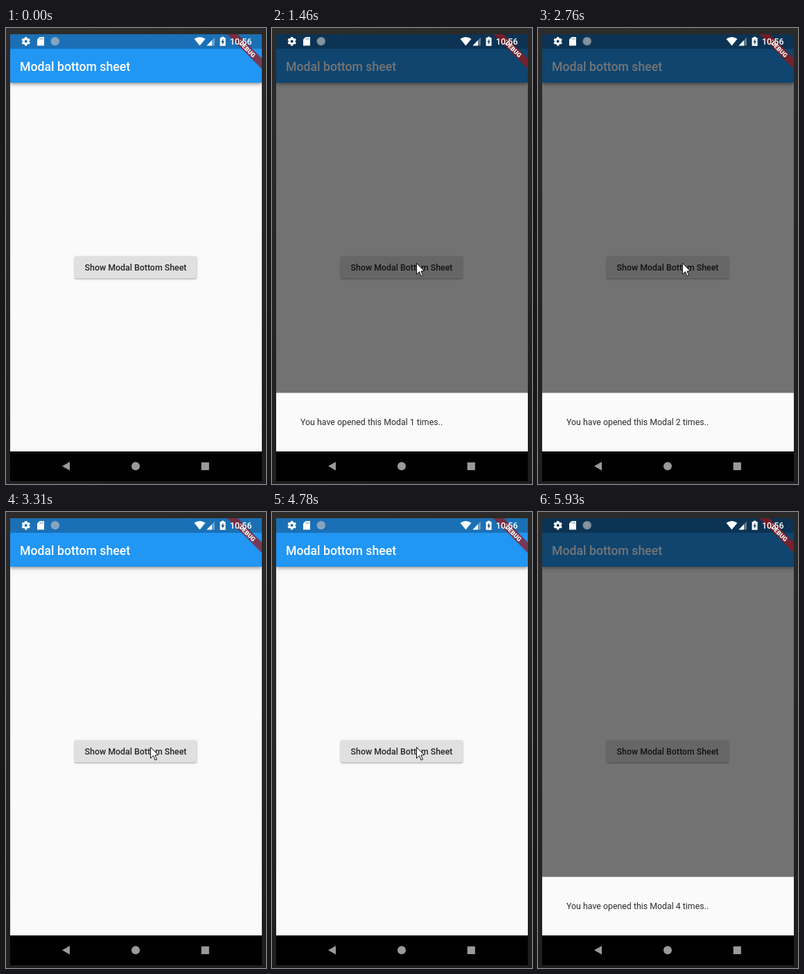
These frames come from a looping animation (375 by 658 pixels, 6.87 s). An HTML page with a canvas:

```html
<!DOCTYPE html>
<html lang="en">
<head>
<meta charset="utf-8">
<title>Modal bottom sheet</title>
<style>
  html, body { margin: 0; width: 100%; height: 100%; overflow: hidden; background: #222; }
  canvas { display: block; width: 375px; height: 658px; }
</style>
</head>
<body>
<canvas id="stage"></canvas>
<script>
const W = 375, H = 658, LOOP = 6870;
const L = 6, R = 369, TOP = 9, BOTTOM = 611, END = 654;
const STEP = 76.7;                 // screen refresh, ms
const SHEET_H = 84.5, SLIDE = 250, OPEN_DELAY = 170;
const PRESS_HOLD = 2 * STEP;
const ENTER = 360, ENTER_MS = 550, LEAVE = 5613, LEAVE_MS = 240;
const REST = { x: 208, y: 339 };

// Every press toggles the sheet.
const presses = [990, 1680, 2290, 2980, 3770, 4480, 5090];

const canvas = document.getElementById('stage');
const ctx = canvas.getContext('2d');
const dpr = window.devicePixelRatio || 1;
canvas.width = W * dpr;
canvas.height = H * dpr;

const clamp = v => Math.max(0, Math.min(1, v));
const stepped = ms => Math.floor((ms + 18) / STEP) * STEP;

function pressState(t) {
  const done = presses.filter(p => p <= t);
  const n = done.length;
  if (!n) return { v: 0, count: 0, held: false };
  const dt = stepped(t - done[n - 1]);
  const opening = n % 2 === 1;
  const v = opening ? clamp((dt - OPEN_DELAY) / SLIDE) : clamp(1 - dt / SLIDE);
  return { v, count: Math.ceil(n / 2), held: dt < PRESS_HOLD - 1 };
}

function pointerAt(t) {
  if (t < ENTER) return null;
  if (t < LEAVE) {
    const left = 1 - clamp(stepped(t - ENTER) / ENTER_MS);
    return { x: REST.x + 36 * left, y: REST.y + 163 * left ** 4 };
  }
  const u = stepped(t - LEAVE) / LEAVE_MS;
  return u < 1 ? { x: REST.x + 43 * u ** 2, y: REST.y + 260 * u ** 1.4 } : null;
}

function box(x, y, w, h, fill) {
  ctx.fillStyle = fill;
  ctx.fillRect(x, y, w, h);
}

function disc(x, y, r, fill) {
  ctx.fillStyle = fill;
  ctx.beginPath();
  ctx.arc(x, y, r, 0, Math.PI * 2);
  ctx.fill();
}

function poly(points, fill, stroke) {
  ctx.beginPath();
  points.forEach(([x, y]) => ctx.lineTo(x, y));
  ctx.closePath();
  ctx.fillStyle = fill;
  ctx.fill();
  if (stroke) {
    ctx.strokeStyle = stroke;
    ctx.lineWidth = 1;
    ctx.stroke();
  }
}

function text(str, x, y, size, weight, fill, align = 'left') {
  ctx.font = `${weight} ${size}px Roboto, sans-serif`;
  ctx.textAlign = align;
  ctx.fillStyle = fill;
  ctx.fillText(str, x, y);
}

function shadow(alpha, blur, dy) {
  ctx.shadowColor = `rgba(0,0,0,${alpha})`;
  ctx.shadowBlur = blur * dpr;
  ctx.shadowOffsetY = dy * dpr;
}

function drawBezel() {
  const g = ctx.createLinearGradient(0, 0, W * 0.6, H);
  g.addColorStop(0, '#2d2c2b');
  g.addColorStop(0.45, '#262626');
  g.addColorStop(1, '#1e1e1e');
  box(0, 0, W, H, g);
}

function drawPage() {
  box(L, TOP, R - L, BOTTOM - TOP, '#fafafa');

  ctx.save();
  shadow(0.42, 5, 2);
  box(L, TOP, R - L, 70, '#2196f3');
  ctx.restore();
  box(L, TOP, R - L, 21, '#1b70b5');
  text('Modal bottom sheet', 20, 61.5, 17.66, 500, '#fff');

  ctx.save();
  shadow(0.36, 2.5, 1);
  ctx.fillStyle = '#e0e0e0';
  ctx.beginPath();
  ctx.roundRect(99, 329.5, 176, 31.8, 2);
  ctx.fill();
  ctx.restore();
  text('Show Modal Bottom Sheet', 187, 349.8, 12.36, 500, '#262626', 'center');
}

function drawSheet({ v, count }) {
  if (v <= 0) return;
  const fade = 1 - (1 - v) ** 3;
  const slide = 1 - (1 - v) ** 2;
  box(L, TOP, R - L, BOTTOM - TOP, `rgba(0,0,0,${0.54 * fade})`);
  const y = BOTTOM - SHEET_H * slide;
  box(L, y, R - L, BOTTOM - y, '#fafafa');
  text(`You have opened this Modal ${count} times..`, 41, y + 46.7, 12.36, 400, '#2c2c2c');
}

function drawBanner() {
  ctx.save();
  ctx.translate(R, TOP);
  ctx.rotate(Math.PI / 4);
  box(-45, 24.7, 90, 10.6, 'rgba(0,0,0,.3)');
  box(-45, 24.7, 90, 10.6, 'rgba(183,28,28,.6)');
  text('DEBUG', 0.5, 33.3, 9, 900, '#fff', 'center');
  ctx.restore();
}

function drawGear(x, y) {
  ctx.save();
  ctx.translate(x, y);
  ctx.strokeStyle = '#fff';
  ctx.lineWidth = 3;
  ctx.beginPath();
  ctx.arc(0, 0, 3.5, 0, Math.PI * 2);
  ctx.stroke();
  for (let i = 0; i < 6; i++) {
    box(-1.6, -6.3, 3.2, 2.6, '#fff');
    ctx.rotate(Math.PI / 3);
  }
  ctx.restore();
}

function drawStatus() {
  drawGear(28.7, 19.3);

  poly([[48.5, 13], [55, 13], [55, 25.5], [45, 25.5], [45, 16.5]], '#fff');
  for (let i = 0; i < 3; i++) box(48.6 + i * 2, 14.4, 1, 2.4, 'rgba(60,110,150,.75)');

  disc(70.8, 19.2, 6.2, 'rgba(210,214,216,.55)');
  disc(70.2, 18.6, 4.6, 'rgba(150,160,166,.4)');

  ctx.fillStyle = '#fff';
  ctx.beginPath();
  ctx.moveTo(279.5, 25.5);
  ctx.lineTo(271.5, 15.8);
  ctx.quadraticCurveTo(279.5, 10.2, 287.5, 15.8);
  ctx.fill();

  poly([[301, 13.5], [301, 25.5], [289.5, 25.5]], 'rgba(255,255,255,.35)');
  poly([[297, 17.7], [297, 25.5], [289.5, 25.5]], '#fff');

  box(310.8, 12.7, 3.6, 2, '#fff');
  box(308.6, 14, 8, 11.8, '#fff');
  poly([[313.3, 15.5], [310.3, 20.6], [312.1, 20.6], [312.1, 24.2], [315, 19], [313.3, 19]], '#26506f');

  text('10:56', 323, 24, 12.4, 500, '#fff');
}

function drawNav() {
  box(L, BOTTOM, R - L, END - BOTTOM, '#000');
  poly([[81, 632.3], [92, 626], [92, 638.6]], '#9a9a9a');
  disc(187, 632.3, 6, '#9a9a9a');
  box(281.7, 626.8, 11.2, 11.2, '#9a9a9a');
}

function drawPointer(at) {
  if (!at) return;
  ctx.save();
  ctx.translate(Math.round(at.x) + 0.5, Math.round(at.y) + 0.5);
  poly([[0, 0], [0, 16], [4, 12], [6.5, 18.5], [9, 17.5], [6.5, 11.5], [11, 11]], '#fff', '#111');
  ctx.restore();
}

function draw(t) {
  const state = pressState(t);
  ctx.setTransform(dpr, 0, 0, dpr, 0, 0);
  drawBezel();
  ctx.save();
  ctx.beginPath();
  ctx.rect(L, TOP, R - L, END - TOP);
  ctx.clip();
  drawPage();
  drawSheet(state);
  drawBanner();
  drawStatus();
  drawNav();
  ctx.restore();
  if (state.held) disc(REST.x - 0.8, REST.y + 0.2, 12, 'rgba(228,228,10,.58)');
  drawPointer(pointerAt(t));
}

const start = performance.now();
function tick() {
  draw((performance.now() - start) % LOOP);
  requestAnimationFrame(tick);
}
tick();
</script>
</body>
</html>
```
